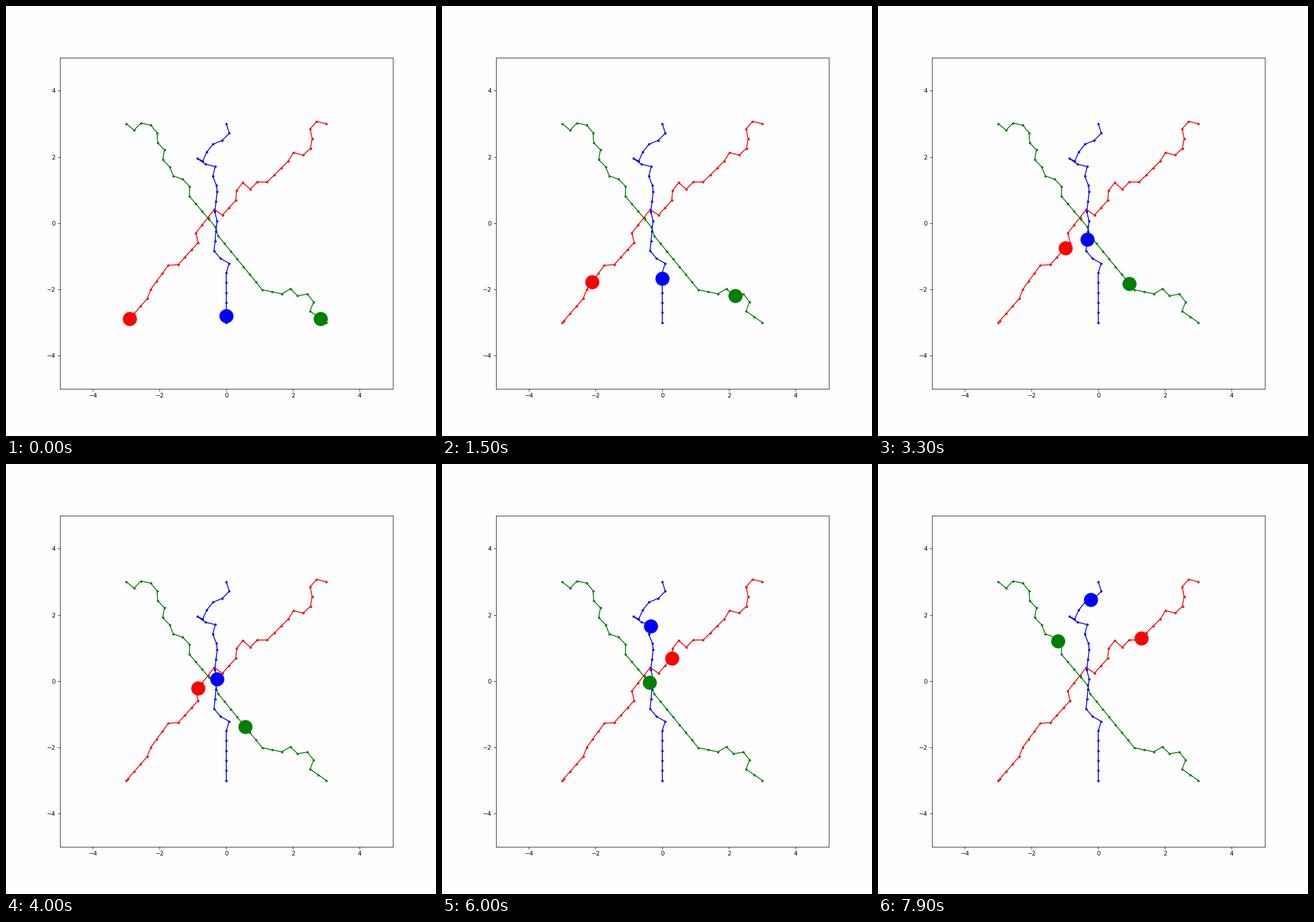
Animation of 748x748 px, one loop 8000 ms. Source, as a matplotlib script:

```python
import numpy as np
import matplotlib.pyplot as plt
from matplotlib.animation import FuncAnimation

FRAMES, INTERVAL = 80, 100
STEP = 0.3
PAPER = "#fefefe"


def plan(start, goal, legs):
    """Walk in equal steps; a leg is a heading in degrees or (heading, steps).

    The small remaining gap to the goal is spread over the whole path.
    """
    pts = [complex(*start)]
    for leg in legs:
        heading, steps = leg if isinstance(leg, tuple) else (leg, 1)
        count = max(1, round(steps))
        move = STEP * steps / count * np.exp(1j * np.radians(heading))
        for _ in range(count):
            pts.append(pts[-1] + move)
    pts = np.array(pts)
    return pts + np.linspace(0, complex(*goal) - pts[-1], len(pts))


def travel(path, offset, speed, accel):
    """Position along the path in each frame, by distance covered."""
    t = np.arange(FRAMES)
    dist = np.append(0, np.cumsum(np.abs(np.diff(path))))
    return np.interp(offset + speed * t + accel * t**2, dist, path)


red = plan((-3, -3), (3, 3),
           [(49, 0.2), (49, 3), 69, (54, 3), 4, (48, 3), 103, (52, 3), -34,
            (48, 2), 85, 52, -40, 46, 0, (45, 3), 58, -14, 43, 80, 101, 49,
            -14])
green = plan((3, -3), (-3, 3),
             [(145, 2), 69, 128, 189, 136, 210, (168, 2), (129, 7), 109,
              (130, 4), 89, 134, 160, 112, 134, 80, 133, 93, 130, 167, 226,
              140])
blue = plan((0, -3), (0, 3),
            [(90, 5), 73, 150, 130, (84, 3), 103, (83, 2), (96, 0.65), 112,
             75, 166, 145, (-24, 0.6), 66, 51, 23, 45, 107])

# colour, path, distance at the first frame, speed, acceleration
robots = [("red", red, 0.15, 0.0926, -7.3e-5),
          ("green", green, 0.21, 0.0825, 0),
          ("blue", blue, 0.2, 0.0744, 7.6e-5)]

fig, ax = plt.subplots(figsize=(10, 10), dpi=74.8, facecolor=PAPER)
ax.set(xlim=(-5, 5), ylim=(-5, 5), facecolor=PAPER)

discs, tracks = [], []
for color, path, *motion in robots:
    ax.plot(path.real, path.imag, ".-", color=color)
    discs += ax.plot([], [], "o", color=color, markersize=22.5, zorder=3)
    tracks.append(travel(path, *motion))


def update(i):
    for disc, track in zip(discs, tracks):
        disc.set_data([track[i].real], [track[i].imag])
    return discs


anim = FuncAnimation(fig, update, frames=FRAMES, interval=INTERVAL,
                     repeat=True, repeat_delay=0)
plt.show()
```
